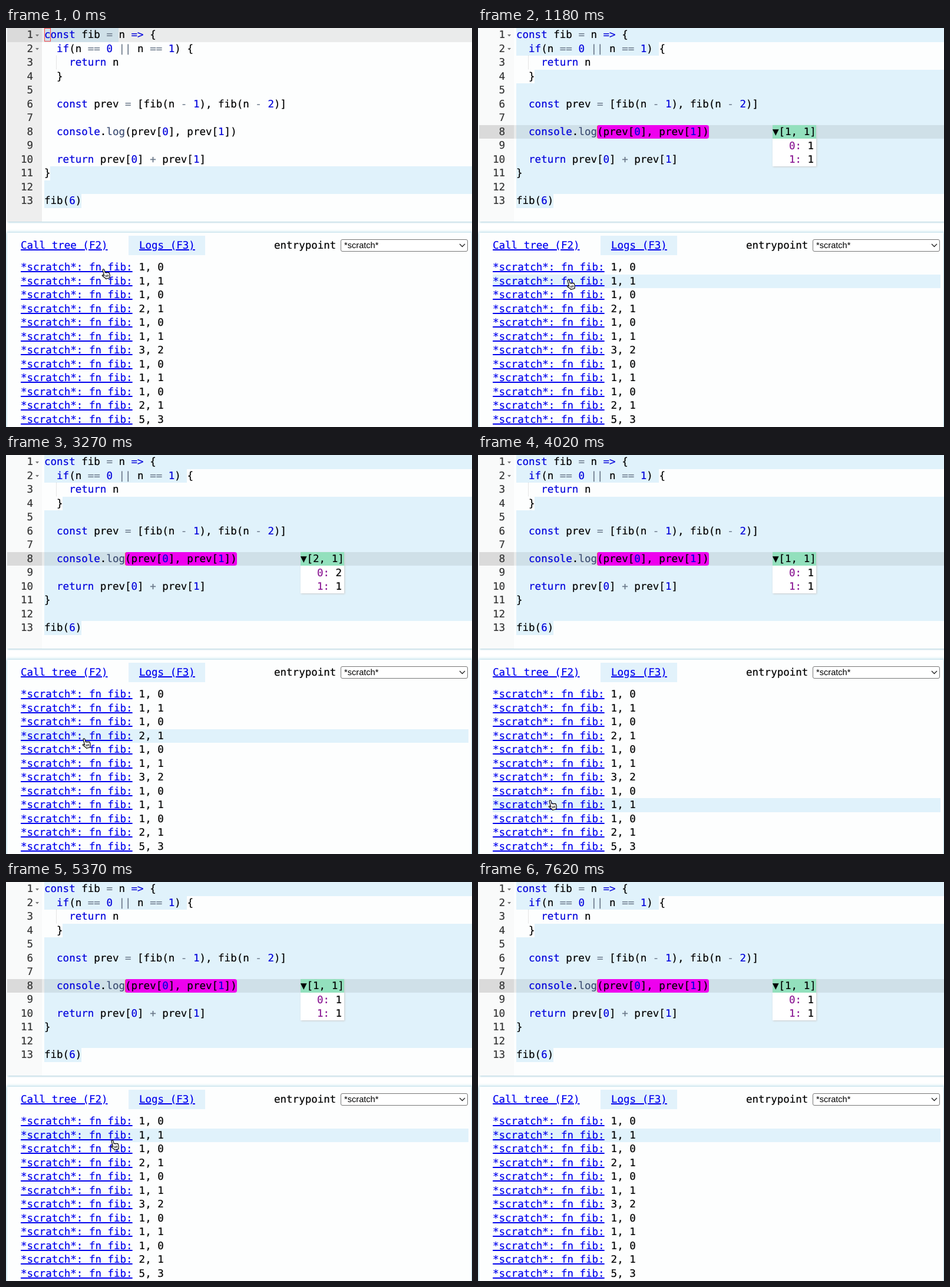
These frames come from a looping animation (791 px wide and 678 px high, 7640 ms). An HTML page:

```html
<!DOCTYPE html>
<html lang="en">
<head>
<meta charset="utf-8">
<style>
  html, body { margin: 0; width: 100%; height: 100%; overflow: hidden; background: #fff; }
  body { position: relative; font: 17.5px/23.5px "DejaVu Sans Mono", monospace; text-rendering: geometricPrecision; color: #000; }
  div, svg { position: absolute; white-space: pre; }
  .editor { left: 2px; top: -10px; width: 800px; height: 339px; background: #fdfefe; box-shadow: 1px 1px 3px #a3cbd9; }
  .gutter { left: 2px; top: 0; width: 59px; height: 329px; }
  .panel { left: 2px; top: 348px; width: 788px; height: 340px; background: #fdfefe; box-shadow: 1px 1px 5px 2px lightblue; }
  .text { -webkit-text-stroke: .2px; }
  .num { color: #333; }
  .key { color: #0000dc; }
  .op { color: #687687; }
  .fn { color: #3c4c72; }
  .link { color: #00e; text-decoration: underline 2px; }
  .prop { color: #881391; }
  .args { left: 202px; top: 165px; width: 190px; height: 23px; border-radius: 4px; background: #ee00ee; box-shadow: inset 1px 0 #ff3060; }
  .caret { left: 65px; top: 0; width: 9px; height: 21px; border: 1px solid #ff4545; }
  .guide { left: 85px; top: 47px; height: 23px; border-left: 1px dotted #ccc; }
  .popup { left: 500px; top: 165px; width: 74px; height: 70px; background: #fff; box-shadow: 1px 1px 3px #ccc; }
  .head { width: 74px; height: 23px; background: #93e0bd; }
  .select { left: 568px; top: 359px; width: 214px; height: 19px; border: 1px solid #767676; border-radius: 3px; background: #fff;
    font: 14.6px/20px "Liberation Sans", Arial, sans-serif; text-indent: 5px; }
</style>
</head>
<body>
<script>
const LOOP = 7640, STEP = 150, ROW = 23.5, TEXT_DROP = 1.3, LOG_TOP = 395, BLUE = '#e0f2fb';
const code = `const fib = n => {
  if(n == 0 || n == 1) {
    return n
  }

  const prev = [fib(n - 1), fib(n - 2)]

  console.log(prev[0], prev[1])

  return prev[0] + prev[1]
}

fib(6)`.split('\n');
const logs = ['1, 0', '1, 1', '1, 0', '2, 1', '1, 0', '1, 1', '3, 2', '1, 0', '1, 1', '1, 0', '2, 1', '5, 3'];

// [time, selected log row]
const selections = [[0, -1], [1050, 1], [2520, 0], [3270, 3], [4020, 8], [5220, 1]];
// [start time, number of steps, x, y]
const moves = [[450, 4, 149, 427], [1920, 3, 151, 405], [2820, 3, 128, 481],
  [3570, 3, 118, 586], [4320, 4, 176, 439], [5070, 1, 176, 438]];
const pointerStart = [161, 409], pointerGone = 6270;

function add(parent, className, html = '', style = {}) {
  const el = document.createElement('div');
  el.className = className;
  el.innerHTML = html;
  Object.assign(el.style, style);
  parent.append(el);
  return el;
}
const text = (parent, x, y, html, className = '') =>
  add(parent, 'text ' + className, html, { left: x + 'px', top: y + TEXT_DROP + 'px' });
const box = (parent, x, y, w, h, background) =>
  add(parent, '', '', { left: x + 'px', top: y + 'px', width: w + 'px', height: h + 'px', background });
const band = (parent, line, x0, x1, color = BLUE, count = 1) =>
  box(parent, x0, (line - 1) * ROW, x1 - x0, ROW * count, color);

function activeLine(parent, line) {
  band(parent, line, 2, 61, '#dadada');
  band(parent, line, 61, 791, 'rgba(0,0,0,.075)');
}
const highlight = line => line.replace(
  /(const|return|\bif\b|=>|console|\d)|(==|\|\||[=+-])|(log)/g,
  (s, key, op) => `<span class="${key ? 'key' : op ? 'op' : 'fn'}">${s.replace('>', '&gt;')}</span>`);

const body = document.body;
add(body, 'editor');

const idle = add(body, '');
add(idle, 'gutter', '', { background: '#eeeeee' });
band(idle, 1, 65, 191);
band(idle, 11, 75, 791);
band(idle, 12, 65, 791);
band(idle, 13, 65, 128);
activeLine(idle, 1);
add(idle, 'caret');

const traced = add(body, '');
add(traced, 'gutter', '', { background: '#f9fafa' });
band(traced, 1, 65, 791);
band(traced, 2, 65, 307);
band(traced, 4, 96, 791);
band(traced, 5, 65, 791, BLUE, 8);
band(traced, 13, 65, 128);
activeLine(traced, 8);
add(traced, 'args');

add(body, 'guide');
code.forEach((line, i) => {
  text(body, 25, i * ROW, String(i + 1).padStart(2), 'num');
  text(body, 65, i * ROW, highlight(line));
});
for (const y of [10.5, 34])
  body.insertAdjacentHTML('beforeend',
    `<svg style="left:50px;top:${y}px" width="7" height="4"><path d="M0 0h6l-3 3.5z" fill="#777"/></svg>`);

const popup = add(body, 'popup');
add(popup, 'head');
const popupText = text(popup, 0, 0, '');

add(body, 'panel');
box(body, 208, 353, 130, 33, '#e2f2fb');
text(body, 25, 357.7, 'Call tree (F2)', 'link');
text(body, 226, 357.7, 'Logs (F3)', 'link');
text(body, 455, 357.7, 'entrypoint');
add(body, 'select', '*scratch*');
body.insertAdjacentHTML('beforeend',
  '<svg style="left:769px;top:366px" width="11" height="7"><path d="M1 1l4.5 4.5L10 1" fill="none" stroke="#222" stroke-width="1.3"/></svg>');

const selectedRow = box(body, 25, 0, 760, ROW, BLUE);
logs.forEach((log, i) => {
  text(body, 25, LOG_TOP + i * ROW, '*scratch*: fn fib:', 'link');
  text(body, 225.6, LOG_TOP + i * ROW, log);
});

body.insertAdjacentHTML('beforeend', `<svg id="pointer" style="left:0;top:0" width="18" height="20">
  <g transform="rotate(-15 8 9)" stroke="#000">
    <path d="M5 1.5c0-1 .7-1.4 1.4-1.4s1.4.5 1.4 1.4V7c.2-.6 2.3-.6 2.5.4.4-.6 2.1-.4 2.3.6.5-.4 1.9-.2 1.9 1.1v3c0 2-1 2.6-1.3 5H6.4C6 15 3.8 13.4 2 10.8c-.6-1 .6-2 1.6-1.2L5 11z" fill="#fff" stroke-width="1.2"/>
    <path d="M7.6 11v3.5M9.6 11v3.5M11.6 11v3.5" stroke-width=".9"/>
  </g></svg>`);
const pointer = document.getElementById('pointer');

function pointerAt(t) {
  let [x, y] = pointerStart;
  for (const [start, steps, toX, toY] of moves) {
    if (t < start) break;
    const p = Math.min(1, (Math.floor((t - start) / STEP) + 1) / steps);
    const eased = p * p * (3 - 2 * p);
    x += (toX - x) * eased;
    y += (toY - y) * eased;
  }
  return [x, y];
}

let shown;
function showSelection(row) {
  if (row === shown) return;
  shown = row;
  const none = row < 0;
  idle.hidden = !none;
  traced.hidden = popup.hidden = selectedRow.hidden = none;
  if (none) return;
  selectedRow.style.top = LOG_TOP + row * ROW + 'px';
  const [a, b] = logs[row].split(', ');
  const entry = (key, value) => `\n<span class="prop" style="margin-left:28px">${key}:</span> ${value}`;
  popupText.innerHTML = `▼[${a}, ${b}]` + entry(0, a) + entry(1, b);
}

function draw(now) {
  const t = now % LOOP;
  showSelection(selections.findLast(([start]) => t >= start)[1]);
  const [x, y] = pointerAt(t);
  pointer.style.transform = `translate(${Math.round(x)}px, ${Math.round(y)}px)`;
  pointer.style.visibility = t < pointerGone ? 'visible' : 'hidden';
  requestAnimationFrame(draw);
}
draw(performance.now());
</script>
</body>
</html>
```
